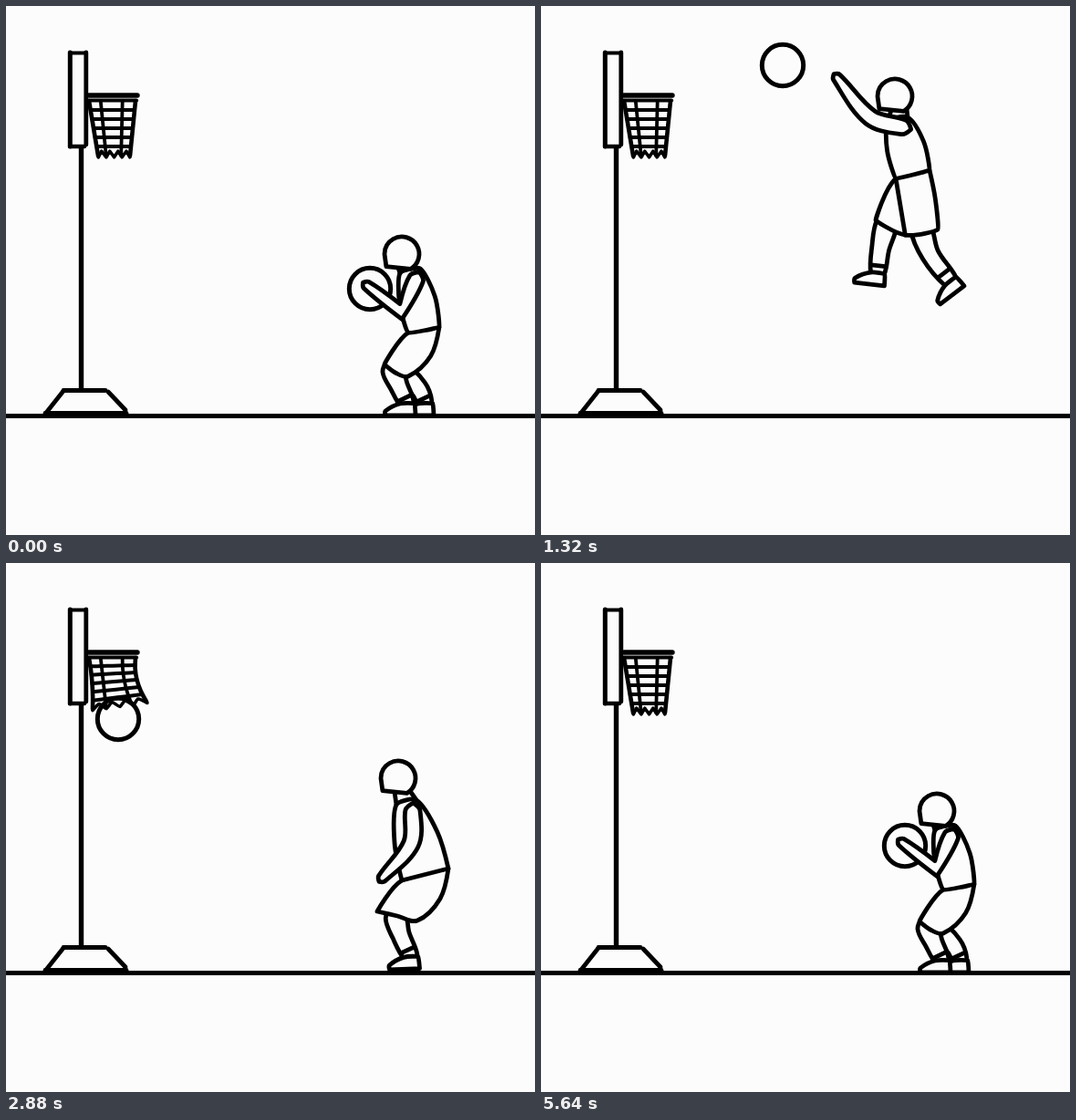
An HTML page with a canvas for the animation above (5760 ms loop, 580x580 px).

```html
<!DOCTYPE html>
<html lang="en">
<head>
<meta charset="utf-8">
<title>Jump shot</title>
<style>
html, body { margin: 0; width: 100%; height: 100%; overflow: hidden; background: #fcfcfc; }
canvas { display: block; width: 580px; height: 580px; }
</style>
</head>
<body>
<canvas id="stage" width="580" height="580"></canvas>
<script>
const ctx = document.getElementById('stage').getContext('2d');
const PAPER = '#fcfcfc', STEP = 120, COUNT = 48, PEN = 4.8, ANKLE_Y = 434;

// Points
const lerp = (a, b, k) => a + (b - a) * k;
const clamp = (v, lo, hi) => Math.min(hi, Math.max(lo, v));
const mix = (a, b, k) => [lerp(a[0], b[0], k), lerp(a[1], b[1], k)];
const add = (p, x, y) => [p[0] + x, p[1] + y];
const unit = (a, b) => {
  const len = Math.hypot(b[0] - a[0], b[1] - a[1]) || 1;
  return [(b[0] - a[0]) / len, (b[1] - a[1]) / len];
};
// Middle of a side, pushed out by d.
const bow = (a, b, d) => {
  const [x, y] = unit(a, b);
  return add(mix(a, b, 0.5), y * d, -x * d);
};

// Poses: a few joints each, the rest of the body follows from them.
const JOINTS = ['head', 'nape', 'waistBack', 'waistFront', 'hemBack', 'hemFront',
  'elbow', 'hand', 'knee', 'ankle', 'farKnee', 'farAnkle'];
function pose(text) {
  const p = text.split(' ').map(s => s.split(',').map(Number));
  if (p.length === 10) p.push(p[8], p[9]);
  return Object.fromEntries(JOINTS.map((name, i) => [name, p[i]]));
}
const mapPose = (p, fn) => Object.fromEntries(JOINTS.map(j => [j, fn(p[j], j)]));
const mixPose = (a, b, k) => mapPose(a, (p, j) => mix(p, b[j], k));
const shiftPose = (a, x, y) => mapPose(a, p => add(p, x, y));

const hold = pose('434,272 454,288 475,352 441,358 441,406 415,393 433,335 395,306 431,417 440,436 452,419 460,436');
const crouch = pose('449,291 468,304 470,384 438,373 440,411 406,403 450,357 416,317 434,419 448,434');
const release = pose('388,99 402,122 426,180 389,189 435,245 367,235 361,122 324,78 372,267 369,293 427,273 449,302');
const fall = pose('437,170 446,197 464,255 415,265 472,312 413,321 427,239 390,269 447,347 450,375 431,347 437,376');
const land = pose('430,236 450,260 485,335 434,348 451,392 407,382 444,308 412,346 433,408 444,432');
const stand = pose('437,210 458,235 465,315 428,319 465,369 426,370 439,290 413,320 444,400 446,432');
const ready = {
  ...mixPose(stand, hold, 0.24),
  elbow: add(hold.elbow, -3, -42),
  hand: add(hold.hand, -3, -42)
};

// Motion
const easeOut = u => 1 - (1 - u) ** 2;
const easeIn = u => u ** 1.4;
const linear = u => u;

// [step, pose, easing into it]
const moves = [
  [0, hold], [2, crouch], [5, crouch],
  [10, shiftPose(release, 1, 4), easeOut], [11, release],
  [17, fall, easeIn], [20, shiftPose(fall, 0, 48)],
  [23, land], [24, land], [25, stand], [35, stand],
  [40, ready], [45, ready], [47, hold]
];
// [step, centre, easing into it, arc height]
const flight = [
  [0, [399, 310]], [2, [408, 315]], [5, [408, 315]], [10, [316, 98], easeOut],
  [11, [265, 65]], [17, [133, 63], linear, 15], [24, [123, 171]],
  [31, [156, 333]], [35, [175, 420]], [45, [358, 322], linear, 60], [47, [399, 310]]
];

function between(keys, n, blend) {
  const i = Math.max(1, keys.findIndex(k => k[0] >= n));
  const a = keys[i - 1], b = keys[i];
  const u = (n - a[0]) / (b[0] - a[0]);
  const value = blend(a[1], b[1], (b[2] || linear)(u));
  return b[3] ? add(value, 0, -4 * b[3] * u * (1 - u)) : value;
}

// Drawing. Handles of a smooth line shrink to nothing at sharp turns.
function tangent(prev, p, next) {
  if (!prev || !next) return [0, 0];
  const a = unit(prev, p), b = unit(p, next), t = unit(prev, next);
  const c = clamp(2 * (a[0] * b[0] + a[1] * b[1]), 0, 1);
  return [t[0] * c, t[1] * c];
}

function stroke(p, closed = false, width = PEN) {
  const n = p.length;
  const at = i => closed ? p[(i + n) % n] : p[i];
  const tan = p.map((q, i) => tangent(at(i - 1), q, at(i + 1)));
  ctx.beginPath();
  ctx.moveTo(...p[0]);
  for (let i = 0; i < (closed ? n : n - 1); i++) {
    const j = (i + 1) % n, a = p[i], b = p[j];
    const h = Math.hypot(b[0] - a[0], b[1] - a[1]) / 3;
    ctx.bezierCurveTo(...add(a, tan[i][0] * h, tan[i][1] * h),
      ...add(b, -tan[j][0] * h, -tan[j][1] * h), ...b);
  }
  if (closed) {
    ctx.closePath();
    ctx.fill();
  }
  ctx.lineWidth = width;
  ctx.stroke();
}
const shape = (...p) => stroke(p, true);
const line = (x1, y1, x2, y2, width = PEN) => stroke([[x1, y1], [x2, y2]], false, width);

// A limb of three joints with rounded ends.
function limb(a, b, c, wa, wb, wc) {
  const d1 = unit(a, b), d2 = unit(b, c), d = unit(a, c);
  const side = (p, dir, w) => add(p, -dir[1] * w / 2, dir[0] * w / 2);
  shape(add(a, -d1[0] * wa / 2, -d1[1] * wa / 2),
    side(a, d1, wa), side(b, d, wb), side(c, d2, wc),
    add(c, d2[0] * wc / 2, d2[1] * wc / 2),
    side(c, d2, -wc), side(b, d, -wb), side(a, d1, -wa));
}

// In the air the sole is square to the shin, on the ground it is level.
function foot(knee, ankle) {
  const [x, y] = unit(knee, ankle);
  const angle = Math.atan2(x, y) * clamp((ANKLE_Y - ankle[1]) / 20, 0, 1);
  const cos = Math.cos(angle), sin = Math.sin(angle);
  const local = (u, v) => add(ankle, -u * cos + v * sin, u * sin + v * cos);
  shape(local(-8, 0), local(8, 0), local(24, 8), local(24, 13), local(-9, 13));
}

function leg(hip, knee, ankle) {
  limb(hip, knee, ankle, 22, 19, 15);
  const [x, y] = unit(knee, ankle), sock = mix(knee, ankle, 0.68);
  stroke([add(sock, -y * 8, x * 8), add(sock, y * 8, -x * 8)]);
  foot(knee, ankle);
}

function head([x, y], r = 19) {
  ctx.beginPath();
  ctx.arc(x, y, r, Math.PI / 3, Math.PI, true);
  ctx.lineTo(x - r * 0.9, y + r * 0.72);
  ctx.closePath();
  ctx.fill();
  ctx.lineWidth = PEN;
  ctx.stroke();
}

function drawPlayer(p) {
  const collar = add(p.nape, -22, 5), shoulder = add(p.nape, -4, 11);
  const gap = p.farAnkle[0] - p.ankle[0], stride = Math.abs(gap);
  const spread = 0.27 * clamp(gap / 40, -1, 1);
  const hip = k => mix(p.hemFront, p.hemBack, 0.45 + k);
  const crotch = bow(p.hemFront, p.hemBack, -0.14 * stride);
  const slant = mix(p.waistFront, p.waistBack, 0.5)[0] - mix(p.hemFront, p.hemBack, 0.5)[0];

  if (stride > 1) leg(hip(spread), p.farKnee, p.farAnkle);
  leg(hip(-spread), p.knee, p.ankle);
  shape(p.waistFront, p.waistBack, bow(p.waistBack, p.hemBack, slant * 0.3),
    p.hemBack, crotch, p.hemFront);
  if (stride > 40) stroke([p.waistFront, crotch]);
  shape(collar, p.nape, bow(p.nape, p.waistBack, 6), p.waistBack,
    p.waistFront, bow(collar, p.waistFront, -5));
  stroke([add(p.head, -4, 15), collar]);
  stroke([add(p.head, 13, 14), p.nape]);
  head(p.head);
  limb(shoulder, p.elbow, p.hand, 16, 17, 9);
}

function drawStand() {
  line(0, 449.5, 590, 449.5, 5.2);
  line(70.3, 51, 70.3, 154, 5);
  line(87.8, 51, 87.8, 152, 4.8);
  line(70, 51.5, 88, 51.5, 4);
  line(70, 154, 86, 154, 4.4);
  line(82.5, 155, 82.5, 420, 5.4);
  line(63, 421.5, 109, 421.5);
  line(63, 422, 44, 446);
  line(112, 423, 131, 443);
  line(43, 446.5, 132, 446.5);
}

// Net point: u across, v down; the ball swings the free end to the right.
function netPoint(u, v, sway) {
  const x = lerp(91 + 10 * v, 142 - 6 * v, u), y = 104 + 60 * v;
  return [x + sway * v * v * (24 * u - 6), y - sway * v * (4 + 8 * u)];
}

function drawNet(sway) {
  const strand = (n, at, width) =>
    stroke(Array.from({ length: n + 1 }, (_, i) => netPoint(...at(i / n, i), sway)), false, width);
  for (const u of [0, 0.25, 0.72, 1]) strand(4, t => [u, t], u % 1 ? 3.8 : 4.6);
  for (let row = 1; row < 6; row++) strand(4, t => [t, row / 6], 4);
  strand(8, (t, i) => [t, i % 2 ? 0.92 : 1.03], 3.6);
  line(91, 98, 144, 98, 5.4);
  line(91, 103.5, 143, 103.5, 4.2);
}

function drawBall(centre) {
  ctx.beginPath();
  ctx.arc(...centre, 22.7, 0, Math.PI * 2);
  ctx.lineWidth = 5;
  ctx.stroke();
}

function draw(n) {
  ctx.fillStyle = PAPER;
  ctx.strokeStyle = '#000';
  ctx.lineCap = ctx.lineJoin = 'round';
  ctx.fillRect(0, 0, 580, 580);
  drawStand();
  drawBall(between(flight, n, mix));
  drawNet(n > 19 && n < 25 ? (n - 19) / 5 : 0);
  drawPlayer(between(moves, n, mixPose));
}

let shown = -1;
const start = performance.now();
function tick() {
  const n = Math.floor((performance.now() - start) / STEP) % COUNT;
  if (n !== shown) draw(shown = n);
  requestAnimationFrame(tick);
}
tick();
</script>
</body>
</html>
```
